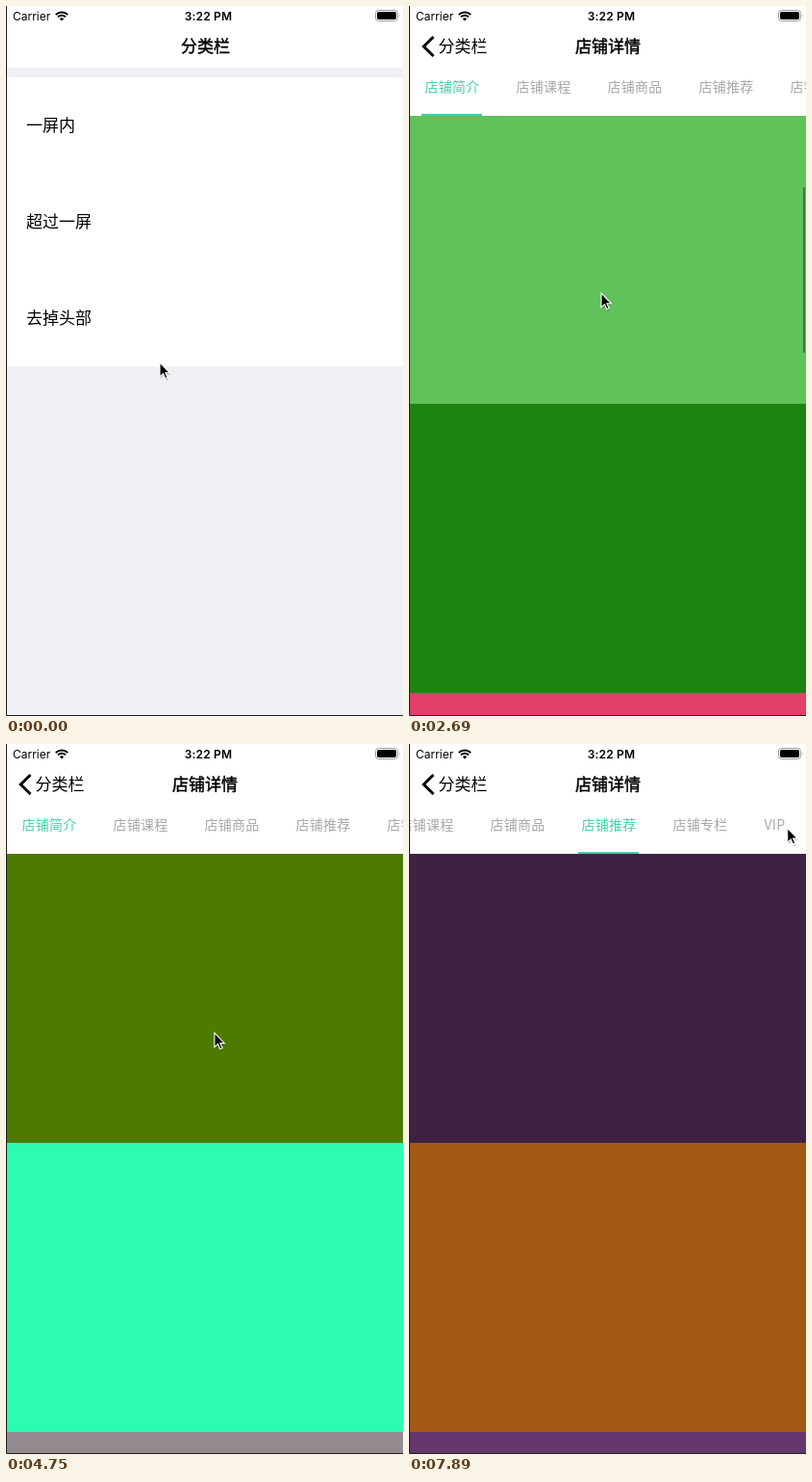
Recreate the animation shown at these times as an HTML page. Size 413x737 px, loop 8000 ms.

```html
<!DOCTYPE html>
<html lang="zh-CN">
<head>
<meta charset="utf-8">
<title>分类栏</title>
<style>
html, body { margin: 0; width: 100%; height: 100%; overflow: hidden; background: #fff; }
svg { display: block; width: 413px; height: 737px; }
text { font-family: "Noto Sans CJK SC", "Noto Sans CJK", "Noto Sans SC", sans-serif; white-space: pre; }
.status { font-family: Inter, sans-serif; font-size: 12px; }
.nav { font-size: 17px; }
.medium { stroke: #000; stroke-width: .45; }
.tab { font-size: 14px; letter-spacing: .25px; fill: #a8a8a8; }
.tab.on { fill: #45d0a8; }
.line { fill: none; stroke-linecap: round; stroke-linejoin: round; }
</style>
</head>
<body>
<svg viewBox="0 0 413 737">
  <g id="list">
    <rect y="64" width="414" height="673" fill="#efeff4"/>
    <rect y="74" width="414" height="300" fill="#fff"/>
    <rect id="press" y="174" width="414" height="100" fill="#d9d9d9"/>
    <g class="nav">
      <text x="21" y="130">一屏内</text>
      <text x="21" y="230">超过一屏</text>
      <text x="21" y="330">去掉头部</text>
    </g>
  </g>
  <rect id="dim" y="64" width="414" height="673"/>

  <g id="shop">
    <rect y="64" width="414" height="673" fill="#fff"/>
    <g id="head">
      <g class="line" stroke="#333" stroke-width="1.2">
        <rect x="12.5" y="98.7" width="19" height="17" rx="3"/>
        <path d="M13.5 102 22 107.5 30.5 102"/>
        <path stroke-linecap="butt" stroke-width="1" d="M384.5 104v12M388.5 97v19M392.5 109v7M396.5 107v9M400.5 101v15M404.5 112v4"/>
      </g>
      <rect x="33" y="95" width="8" height="8" fill="#ff5f5c"/>
      <text x="211" y="225" font-size="11" fill="#aaa" text-anchor="middle">会员</text>
      <g font-size="13" fill="#444">
        <text x="92" y="311">累计收益</text>
        <text x="304" y="311">累计销量</text>
      </g>
      <g class="line" stroke="#a598ea" stroke-width="1.2">
        <circle cx="70" cy="315.5" r="11.4"/>
        <path d="M62 324 60 327.5H64M78 324 80 327.5H76"/>
        <circle cx="70" cy="315.5" r="8" fill="#ded8fb" stroke="none"/>
        <path stroke="#fff" stroke-width="1.5" d="M67 311.5 70 315 73 311.5M70 315V320M67 315.5H73M67 318H73"/>
      </g>
      <g class="line" stroke="#f58584" stroke-width="1">
        <path fill="#ffd3d2" d="M271.5 325V317.5H276.5V325ZM278.5 325V312.5H283.5V325ZM285.5 325V314.5H290.5V325Z"/>
        <path d="M270 325.3H293M270.5 316 278 308.5 284 312.5 293 305.5M288.5 305.5H293.3V310"/>
      </g>
      <rect y="351" width="414" height="10" fill="#f4f4f9"/>
    </g>
    <g id="pages"></g>
    <g id="bar">
      <rect width="414" height="50" fill="#fff"/>
      <g id="tabs"><rect id="mark" y="48" height="2" fill="#45cda5"/></g>
    </g>
    <rect id="thumb" x="410" width="2" height="172" rx="1"/>
  </g>

  <rect width="414" height="64" fill="#fff"/>
  <path id="back" d="M25.5 32 15.3 42 25.5 52" fill="none" stroke="#000" stroke-width="3"/>
  <text id="first" class="nav" y="48">分类栏</text>
  <text id="second" class="nav medium" y="48">店铺详情</text>

  <text class="status" x="7" y="15">Carrier</text>
  <text class="status" x="210.5" y="15" font-weight="600" text-anchor="middle" letter-spacing=".2">3:22 PM</text>
  <g fill="none" stroke="#000" stroke-width="2">
    <path d="M51.8 9A8.8 8.8 0 0 1 64.2 9M54 11.4A5.7 5.7 0 0 1 62 11.4"/>
    <path d="M58 15.6 55.8 13.3A3.1 3.1 0 0 1 60.2 13.3Z" fill="#000" stroke="none"/>
  </g>
  <rect x="384.5" y="4.5" width="23" height="11" rx="3" fill="none" stroke="#999"/>
  <rect x="386" y="6" width="20" height="8" rx="1.8"/>
  <path d="M409 8.3Q410.6 10 409 11.7Z" fill="#999"/>

  <path d="M.5 0V736.5H413" fill="none" stroke="#1c1c1e"/>
  <g id="cursor">
    <path d="M0 .8V15.8L3.6 12.6 6 17.8 8.4 16.7 6.1 11.7H10.6Z" opacity=".22" transform="translate(.6 1)"/>
    <path d="M0 0V14.8L3.5 11.6 5.8 16.8 8.1 15.8 5.9 10.8H10.4Z" stroke="#fff" stroke-width="1.1"/>
  </g>
</svg>
<script>
const LOOP = 8000, STEP = LOOP / 54, W = 414;
const SWIPE_START = 3126, SWIPE = 321, SWIPES = 5;
const $ = id => document.getElementById(id);

function add(parent, tag, attrs, text) {
  const el = document.createElementNS('http://www.w3.org/2000/svg', tag);
  for (const k in attrs) el.setAttribute(k, attrs[k]);
  if (text) el.textContent = text;
  return parent.appendChild(el);
}
const move = (id, x, y) => $(id).setAttribute('transform', `translate(${x} ${y})`);

const clamp = (v, max = 1) => Math.min(max, Math.max(0, v));
const smooth = u => u * u * (3 - 2 * u);
const easeOut = u => 1 - (1 - u) ** 3;
const ramp = (t, from, to, ease = smooth) => ease(clamp((t - from) / (to - from)));
const mix = (a, b, u) => a + (b - a) * u;

const colors = [
  ['#6af6dc', '#60c25b', '#1e8410', '#e43e6a'],
  ['#b946a0', '#f4f3cf', '#40f712'],
  ['#4e5581', '#77ff13', '#0c70e0'],
  ['#3e2145', '#a25913', '#66366e'],
  ['#c0127f', '#9d7717', '#dd485f'],
  ['#4d7b00', '#2cfcb2', '#938b90']
];
const pages = colors.map(list => {
  const g = add($('pages'), 'g', {});
  list.forEach((fill, i) => add(g, 'rect', { y: i * 300, width: W, height: 300, fill }));
  return g;
});

let nextX = 16.5;
const tabs = ['店铺简介', '店铺课程', '店铺商品', '店铺推荐', '店铺专栏', 'VIP', '大礼包', '店铺特色'].map(name => {
  const w = name === 'VIP' ? 21.5 : name.length * 14.25;
  const tab = { x: nextX, w, el: add($('tabs'), 'text', { class: 'tab', x: nextX, y: 25 }, name) };
  nextX += w + 38;
  return tab;
});
const centred = tab => tab.x + tab.w / 2 - 208;

// Where the pointer rests or turns: time, x, y
const stops = [
  [0, 160, 370], [600, 130, 232], [900, 130, 232], [1480, 167, 509], [2100, 185, 250],
  [2667, 200, 298], [3126, 217, 292], [3704, 217, 286], [4296, 217, 309], [4731, 217, 300],
  [5500, 60, 25], [5778, 40, 97], [6550, 44, 96], [7590, 393, 88], [LOOP, 394, 87]
];
function pointer(t, swipes) {
  const i = stops.findIndex(s => s[0] > t);
  const [a, b] = [stops[i - 1], stops[i]];
  const u = ramp(t, a[0], b[0]);
  const swiping = swipes > 0 && swipes < SWIPES;
  const drag = swiping ? 60 * Math.cos(2 * Math.PI * (swipes - .27)) : 0;
  return [mix(a[1], b[1], u) + drag, mix(a[2], b[2], u)];
}

function draw(t) {
  // Opening the shop page
  const p = ramp(t, 750, 1250, easeOut);
  move('list', -W * .3 * p, 0);
  $('press').style.opacity = t >= 600 && p < 1 ? 1 : 0;
  $('dim').style.opacity = p < 1 ? p * .1 : 0;
  move('shop', W * (1 - p), 0);
  $('back').style.opacity = p;
  $('first').setAttribute('x', mix(182, 30.5, p));
  $('first').classList.toggle('medium', p < .5);
  $('second').setAttribute('x', mix(313, 173, p));
  $('second').style.opacity = p;

  // Header scrolls away first, then the page below the tabs
  const head = 297 * ramp(t, 1500, 2250);
  const inner = 301 * ramp(t, 2100, 2660);
  const top = 361 - head;
  move('head', 0, -head);
  move('bar', 0, top);

  // Five quick swipes, then a tap two tabs back
  const swipes = clamp((t - SWIPE_START) / SWIPE, SWIPES);
  const page = Math.floor(swipes) + smooth(swipes % 1) - 2 * ramp(t, 5780, 6400, easeOut);
  pages.forEach((g, i) => {
    g.style.display = Math.abs(i - page) < 1 ? '' : 'none';
    g.setAttribute('transform', `translate(${Math.round(1 + (i - page) * W)} ${top + 50 - (i ? 0 : inner)})`);
  });

  const shift = mix(centred(tabs[5]) * ramp(t, 4900, 5300), centred(tabs[3]), ramp(t, 6500, 6850));
  const selected = t < 5000 ? 0 : t < 6500 ? 5 : 3;
  move('tabs', -shift, 0);
  tabs.forEach((tab, i) => tab.el.classList.toggle('on', i === selected));
  const a = tabs[Math.floor(page)], b = tabs[Math.ceil(page)], u = page % 1;
  $('mark').setAttribute('x', mix(a.x, b.x, u) - 3.5);
  $('mark').setAttribute('width', mix(a.w, b.w, u) + 6);

  $('thumb').setAttribute('y', 114 + inner * .246);
  $('thumb').style.opacity = .38 * (ramp(t, 2100, 2250) - ramp(t, 2700, 2990));
  move('cursor', ...pointer(t, swipes));
}

// The screen refreshes in even steps
const start = performance.now();
function tick(now) {
  const t = Math.max(0, now - start) % LOOP;
  draw(Math.floor(t / STEP) * STEP);
  requestAnimationFrame(tick);
}
draw(0);
requestAnimationFrame(tick);
</script>
</body>
</html>
```
